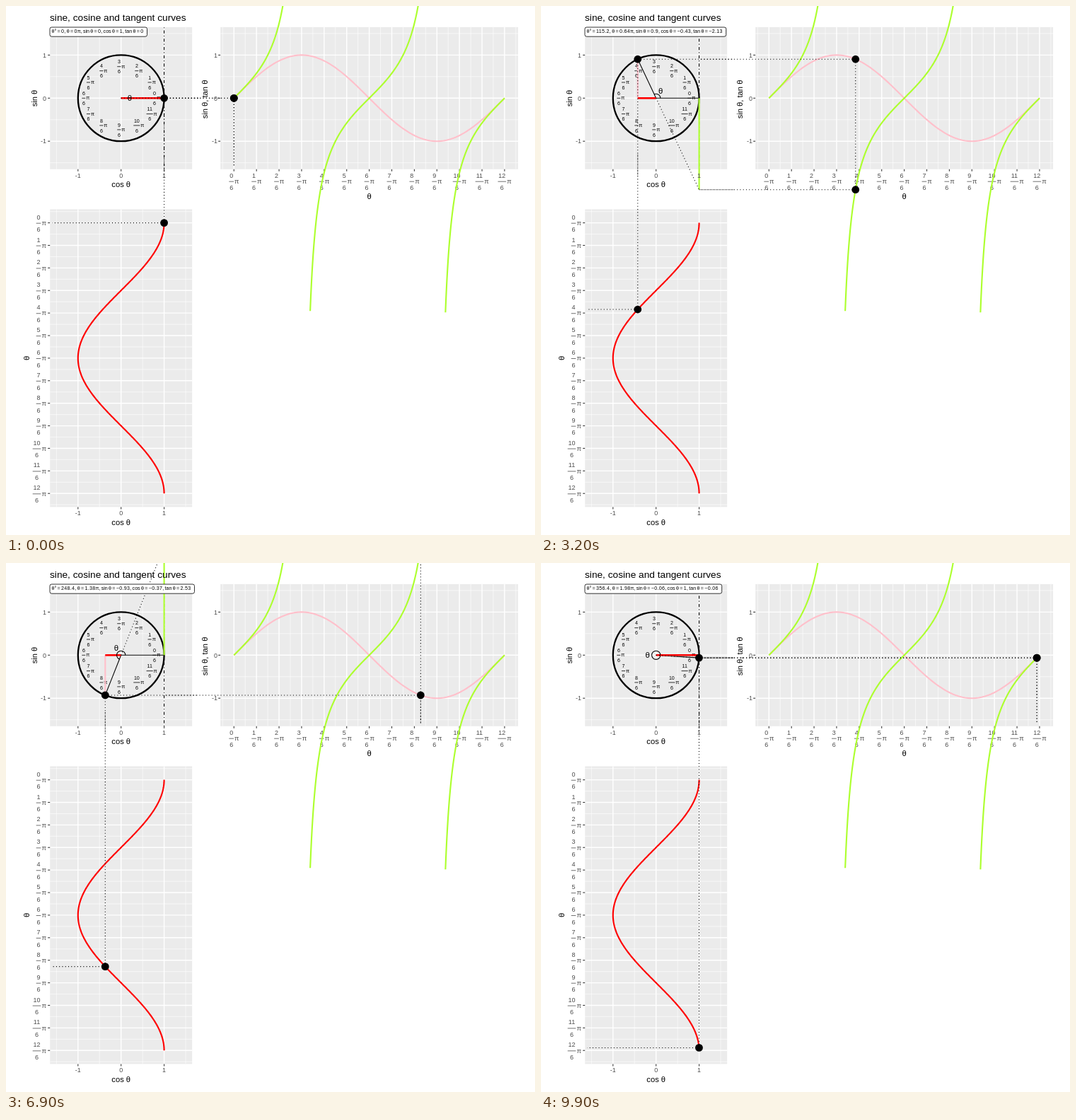
An HTML page with a canvas for the animation above (10 s loop, 748 px wide and 748 px high).

```html
<!DOCTYPE html>
<html lang="en">
<head>
<meta charset="utf-8">
<title>sine, cosine and tangent curves</title>
<style>
html, body { margin: 0; width: 100%; height: 100%; overflow: hidden; background: #fff; }
canvas { display: block; }
</style>
</head>
<body>
<canvas id="stage" width="748" height="748"></canvas>
<script>
const ctx = document.getElementById('stage').getContext('2d');
const R = 60.9;                 // pixels per unit, shared by all panels
const CX = 162.7, CY = 130.3;   // circle centre
const TX = 322.3, TY = 306.6;   // where theta = 0 on the right and lower panels
const HALF = 1.65 * R, PAD = 0.1 * Math.PI * R, STEP = R * Math.PI / 6;
const SPAN = 2 * Math.PI * R;
const FAMILY = '"Liberation Sans", Arial, sans-serif';
const GREEN = '#adff2f', PINK = '#ffc0cb', RED = '#f00', AXIS = '#4d4d4d';
const DOTS = [1.07, 3.2], DOTDASH = [1.07, 3.2, 4.27, 3.2];

const px = c => CX + c * R;
const py = s => CY - s * R;
const tx = a => TX + a * R;
const ty = a => TY + a * R;

function line(x1, y1, x2, y2, color = '#000', width = 1.07, dash = []) {
  ctx.strokeStyle = color;
  ctx.lineWidth = width;
  ctx.setLineDash(dash);
  ctx.beginPath();
  ctx.moveTo(x1, y1);
  ctx.lineTo(x2, y2);
  ctx.stroke();
  ctx.setLineDash([]);
}

const dotted = (x1, y1, x2, y2) => line(x1, y1, x2, y2, '#000', 1.07, DOTS);

function curve(from, to, color, point) {
  const n = 200;
  ctx.strokeStyle = color;
  ctx.lineWidth = 2.13;
  ctx.beginPath();
  for (let i = 0; i <= n; i++) ctx.lineTo(...point(from + (to - from) * i / n));
  ctx.stroke();
}

function dot(x, y) {
  ctx.fillStyle = '#000';
  ctx.beginPath();
  ctx.arc(x, y, 5.4, 0, 7);
  ctx.fill();
}

// y is the middle of the digits
function text(str, x, y, size, color = '#000', align = 'center') {
  ctx.font = `${size}px ${FAMILY}`;
  ctx.fillStyle = color;
  ctx.textAlign = align;
  ctx.fillText(str, x, y + size * 0.36);
}

function upright(str, x, y, size) {
  ctx.save();
  ctx.translate(x, y);
  ctx.rotate(-Math.PI / 2);
  text(str, 0, 0, size);
  ctx.restore();
}

// k/6 pi; align: 0.5 centres on x, 1 ends at x
function fraction(k, x, y, size, color, align) {
  const bar = String(k).length * size * 0.556 + size * 0.18;
  const left = x - align * (bar + size * 0.8);
  const mid = left + bar / 2;
  text(k, mid, y - size * 0.97, size, color);
  text('6', mid, y + size, size, color);
  line(left, y, left + bar, y, color, 0.8);
  text('π', left + bar + size * 0.12, y - size * 0.08, size * 1.05, color, 'left');
}

function panel(x1, y1, x2, y2, minorX, majorX, minorY, majorY) {
  ctx.fillStyle = '#ebebeb';
  ctx.fillRect(x1, y1, x2 - x1, y2 - y1);
  const grid = (xs, ys, w) => {
    xs.forEach(x => line(x, y1, x, y2, '#fff', w));
    ys.forEach(y => line(x1, y, x2, y, '#fff', w));
  };
  grid(minorX, minorY, 0.6);
  grid(majorX, majorY, 1.4);
  majorX.forEach(x => line(x, y2, x, y2 + 3, '#333'));
  majorY.forEach(y => line(x1 - 3, y, x1, y, '#333'));
}

const units = [-1, 0, 1], halves = [-1.5, -0.5, 0.5, 1.5];
const sixths = Array.from({ length: 13 }, (_, k) => k);
const between = Array.from({ length: 14 }, (_, k) => k - 0.5);

function rounded(v) {
  const s = Math.abs(v) > 1e10 ? v.toExponential(6) : String(Number(v.toFixed(2)));
  return s.replace(/^-/, '−');
}

function caption(a, deg) {
  const parts = ['θ° = ', rounded(deg), ', θ = ', rounded(a / Math.PI), 'π, sin θ = ', rounded(Math.sin(a)),
    ', cos θ = ', rounded(Math.cos(a)), ', tan θ = ', rounded(Math.tan(a))];
  const size = 7.1;
  const style = i => {
    ctx.letterSpacing = i % 2 ? '0.3px' : '0px';
    ctx.wordSpacing = '-0.63px';
  };
  ctx.font = `${size}px ${FAMILY}`;
  const widths = parts.map((p, i) => { style(i); return ctx.measureText(p).width; });
  const total = widths.reduce((s, w) => s + w, 0);
  ctx.beginPath();
  ctx.roundRect(62, 30, total + 7.5, 13.2, 2.5);
  ctx.fillStyle = '#fff';
  ctx.fill();
  ctx.strokeStyle = '#000';
  ctx.lineWidth = 0.8;
  ctx.stroke();
  let x = 64.5;
  parts.forEach((p, i) => {
    style(i);
    text(p, x, 35.4, size, '#000', 'left');
    x += widths[i];
  });
  ctx.letterSpacing = ctx.wordSpacing = '0px';
}

function circlePlot(a, deg) {
  const c = Math.cos(a), s = Math.sin(a), t = Math.tan(a);
  const x = px(c), y = py(s), edge = px(1);
  const reach = Math.min(1, 14 / Math.abs(t));   // keeps the ray finite
  const tanY = py(t * reach);

  panel(px(-1.65), CY - HALF, px(1.65), CY + HALF,
    halves.map(px), units.map(px), halves.map(py), units.map(py));

  ctx.strokeStyle = '#000';
  ctx.lineWidth = 2.3;
  ctx.beginPath();
  ctx.arc(CX, CY, R, 0, 7);
  ctx.stroke();
  for (let k = 0; k < 12; k++) {
    const b = k * Math.PI / 6;
    fraction(k, CX + 50 * Math.cos(b), CY - 44.6 * Math.sin(b), 7.1, '#000', 0.5);
  }

  line(edge, CY + HALF, edge, CY - HALF, '#000', 1.07, DOTDASH);
  line(CX, CY, edge, CY);
  line(CX, CY, x, y);
  line(x, CY, x, y, PINK, 2.13);
  line(edge, CY, edge, tanY, GREEN, 2.13);
  line(CX, CY, x, CY, RED, 2.6);
  dotted(x, y, px(1.8), y);
  dotted(x, y, x, py(-1.8));
  dotted(CX, CY, px(reach), tanY);
  if (reach === 1) dotted(edge, tanY, px(1.8), tanY);

  ctx.strokeStyle = '#000';
  ctx.lineWidth = 1.07;
  ctx.beginPath();
  ctx.arc(CX, CY, 0.1 * R, 0, -a, true);
  ctx.stroke();
  text('θ', CX + 12.1 * Math.cos(a / 2), CY - 12.1 * Math.sin(a / 2), 11.4);
  dot(x, y);
  caption(a, deg);

  units.forEach(v => {
    text(v, px(v), 239.8, 9, AXIS);
    text(v, 57, py(v), 9, AXIS, 'right');
  });
  text('cos θ', CX, 252.4, 11.2);
  upright('sin θ', 39.5, 130.5, 11.2);
  text('sine, cosine and tangent curves', 62, 15.8, 13.7, '#000', 'left');
}

function wavePlot(a) {
  const x = tx(a), sinY = py(Math.sin(a));
  const tanY = py(Math.max(-14, Math.min(14, Math.tan(a))));
  const base = py(-1.6), start = tx(-1.6);
  const ticks = sixths.map(k => TX + k * STEP);

  panel(TX - PAD, CY - HALF, TX + SPAN + PAD, CY + HALF,
    between.map(k => TX + k * STEP), ticks, halves.map(py), units.map(py));
  ticks.forEach((t, k) => fraction(k, t, 248.2, 9, AXIS, 0.5));
  units.forEach(v => text(v, 299, py(v), 9, AXIS, 'right'));
  text('θ', 513.6, 269, 11.2);
  upright('sin θ, tan θ', 281, 132, 11.2);

  curve(0, 2 * Math.PI, PINK, b => [tx(b), py(Math.sin(b))]);
  [[0, 1.37], [1.7705, 4.51], [1.7692 + Math.PI, 2 * Math.PI]].forEach(([from, to]) =>
    curve(from, to, GREEN, b => [tx(b), py(Math.tan(b))]));

  dotted(x, sinY, start, sinY);
  dotted(x, sinY, x, base);
  dotted(x, tanY, start, tanY);
  dotted(x, tanY, x, base);
  dot(x, sinY);
  dot(x, tanY);
}

function cosPlot(a) {
  const x = px(Math.cos(a)), y = ty(a);
  const ticks = sixths.map(k => TY + k * STEP);

  panel(px(-1.65), TY - PAD, px(1.65), TY + SPAN + PAD,
    halves.map(px), units.map(px), between.map(k => TY + k * STEP), ticks);
  ticks.forEach((t, k) => fraction(k, 56.5, t + 0.6, 9, AXIS, 1));
  units.forEach(v => text(v, px(v), 717.2, 9, AXIS));
  text('cos θ', CX, 730, 11.2);
  upright('θ', 29, 498, 11.2);

  curve(0, 2 * Math.PI, RED, b => [px(Math.cos(b)), ty(b)]);
  dotted(x, y, px(-1.6), y);
  dotted(x, y, x, ty(-1.6));
  dot(x, y);
}

let shown = -1;
function draw(now) {
  const step = Math.floor(now / 100) % 100;
  if (step !== shown) {
    shown = step;
    const deg = step * 3.6, a = step * Math.PI / 50;
    ctx.fillStyle = '#fff';
    ctx.fillRect(0, 0, 748, 748);
    circlePlot(a, deg);
    wavePlot(a);
    cosPlot(a);
  }
  requestAnimationFrame(draw);
}
draw(0);
</script>
</body>
</html>
```
